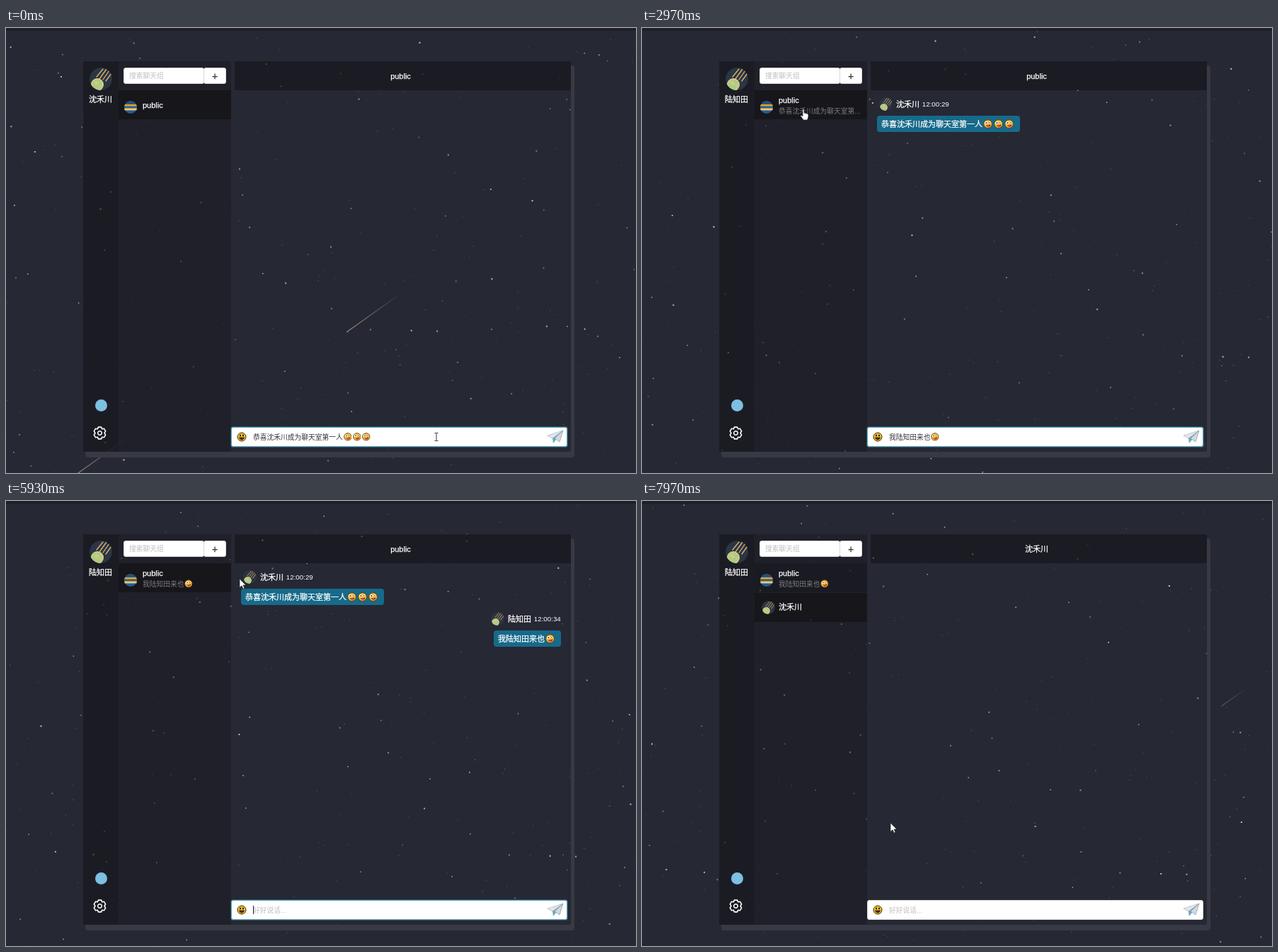
An HTML page with a canvas that plays this animation: 890x629 px, repeating every 8 s.

```html
<!DOCTYPE html>
<html lang="zh">
<head>
<meta charset="utf-8">
<title>Chat room</title>
<style>
html, body { margin: 0; width: 100%; height: 100%; overflow: hidden; background: #262834; }
#stage { position: absolute; left: 0; top: 0; width: 890px; height: 629px; overflow: hidden;
  font: 500 11px/20px "Liberation Sans", "Noto Sans CJK SC", "Noto Sans CJK", sans-serif; color: #fff; }
#stage div, #stage canvas { position: absolute; white-space: nowrap; box-sizing: border-box; }
.strong { -webkit-text-stroke: .25px; }
.small { font-size: 9.75px; font-weight: 400; }
.grey { color: #7b7c80; }
.hint { color: #bfbfbf; }
.ink { color: #333; }
.card { background: #fff; border-radius: 3px; }
.field { background: #fff; border: 1px solid #d9d9d9; border-radius: 3px; }
.focus { border: 1px solid #5aa9c4; border-radius: 3px; box-shadow: 0 0 0 1px rgba(87, 170, 200, .3); }
.panel { background: rgba(20, 19, 23, .58); }
.row { background: rgba(17, 17, 20, .65); }
.bubble { background: #176a8a; border-radius: 4px; }
.dot { background: #7cc0e3; border-radius: 50%; }
.mid { text-align: center; }
.emoji { width: 1.2em; height: 1.2em; margin: 0 .08em; vertical-align: -.27em; }
svg { display: block; }
.emoji { display: inline; }
#shadow { left: 109px; top: 47px; width: 689px; height: 552px; border-radius: 3px; box-shadow: 4px 7px 0 1px #373944; }
</style>
</head>
<body>
<svg width="0" height="0" style="position:absolute">
  <clipPath id="disc"><circle r="16"/></clipPath>
  <symbol id="comet" viewBox="-16 -16 32 32">
    <g clip-path="url(#disc)">
      <circle r="16" fill="#2b3544"/>
      <circle cx="-5" cy="8" r="9" fill="#e0cf8a"/>
      <circle cx="-5" cy="8" r="7.5" fill="#a9cc86"/>
      <path d="M-10 4l5-1 3 4-5 2zM-2 9l4-1-2 5z" fill="#d8c877"/>
      <path d="M3-14L-6-3M8-14L-2 0M12-12L3 1M15-8L7 3" stroke="#dfb56a" stroke-width="1.3" stroke-linecap="round"/>
    </g>
  </symbol>
  <symbol id="planet" viewBox="-10 -10 20 20">
    <circle r="9" fill="#1f5f96"/>
    <path d="M-8-4H8L8.800-1.500H-8.800zM-8.900 1H8.900L8.200 4H-8.200z" fill="#e8a02f"/>
    <path d="M-8.500 3H8.500V4.200H-8.300z" fill="#f4e3b8"/>
    <path d="M-5-7.500H5L7-5.500H-7z" fill="#36465c"/>
  </symbol>
  <symbol id="zany" viewBox="0 0 12 12">
    <circle cx="6" cy="6" r="5.4" fill="#f6b62c" stroke="#5b3b12" stroke-width=".8"/>
    <circle cx="3.8" cy="4.6" r="1.9" fill="#fff"/><circle cx="8" cy="4.2" r="1.4" fill="#fff"/>
    <circle cx="4" cy="4.7" r=".8"/><circle cx="8" cy="4.3" r=".6"/>
    <path d="M3 7.4Q6.5 8.6 9.4 6.5Q9.2 10 6 10Z" fill="#6b2d17"/>
    <path d="M5.4 8.4h2.6v1.6q-1.3 1.4-2.6 0z" fill="#e5566b"/>
  </symbol>
  <symbol id="smile" viewBox="0 0 14 14">
    <circle cx="7" cy="7" r="6" fill="#f7c331" stroke="#3a2c10"/>
    <ellipse cx="5" cy="5" rx=".9" ry="1.4"/><ellipse cx="9" cy="5" rx=".9" ry="1.4"/>
    <path d="M3 7.6H11Q10.4 11.4 7 11.4T3 7.6Z" fill="#4a2b12"/>
  </symbol>
  <symbol id="gear" viewBox="-10 -10 20 20">
    <path d="M-2-8H2L3-5.5 5.6-6 7.8-2.5 6.2 0 7.8 2.5 5.6 6 3 5.5 2 8H-2L-3 5.5-5.6 6-7.8 2.5-6.2 0-7.8-2.5-5.6-6-3-5.5Z"
      fill="none" stroke="#fff" stroke-width="1.5" stroke-linejoin="round"/>
    <circle r="2.7" fill="none" stroke="#fff" stroke-width="1.4"/>
  </symbol>
  <symbol id="plane" viewBox="0 0 24 22">
    <path d="M1 9L23 2 8 13Z" fill="#e4e7ea" stroke="#a9b0b6" stroke-width=".7"/>
    <path d="M23 2L8 13 9 20Z" fill="#69a9c6"/>
    <path d="M23 2L11 13 18 18Z" fill="#d3d9de" stroke="#8d979f" stroke-width=".7"/>
  </symbol>
  <symbol id="arrow" viewBox="0 0 14 20">
    <path d="M1 1V13.5L4 10.8 6 15.2 8 14.3 6 10H10Z" fill="#fff" stroke="#222" stroke-width=".7"/>
  </symbol>
  <symbol id="hand" viewBox="0 0 14 20">
    <path d="M4 2.2Q5 .5 6 2.2V7L11 8.2Q12 8.5 12 10V13L10.5 17H5L1 11.5Q1 9.5 4 11.5Z" fill="#fff" stroke="#222" stroke-width=".7"/>
  </symbol>
  <symbol id="beam" viewBox="0 0 14 20">
    <path d="M4.5 4.5H6.5L7 5 7.5 4.5H9.5M7 5V15M4.5 15.5H6.5L7 15 7.5 15.5H9.5" fill="none" stroke="#333"/>
  </symbol>
</svg>
<div id="stage"><canvas id="sky" width="890" height="629"></canvas><div id="shadow"></div></div>
<script>
const W = 890, H = 629, LOOP = 8000, STEP = 135;
const SENT = 540, SWITCH = 1620, FOCUS = 3900, REPLY = 5200, POPUP = 6300, FRIEND = 7540;
const ANNA = '沈禾川', BEN = '陆知田';
const HELLO = `恭喜${ANNA}成为聊天室第一人***`, ANSWER = `我${BEN}来也*`, PROMPT = '好好说话...';
const stage = document.getElementById('stage');
const parts = [];

// every part is visible from one time until another; * stands for the emoji
function add(css, html, cls, from = 0, to = LOOP) {
  const node = document.createElement('div');
  node.className = cls;
  node.style.cssText = css;
  node.innerHTML = html.replace(/\*/g, '<svg class="emoji"><use href="#zany"/></svg>');
  stage.append(node);
  parts.push({ node, from, to });
  return node;
}
const box = (x, y, w, h, cls, from, to) =>
  add(`left:${x}px;top:${y}px;width:${w}px;height:${h}px`, '', cls, from, to);
const text = (x, y, str, cls, from, to) => add(`left:${x}px;top:${y - 10}px`, str, cls, from, to);
const centred = (x, y, str, cls, from, to) =>
  add(`left:${x - 60}px;top:${y - 10}px;width:120px`, str, 'mid ' + cls, from, to);
const icon = (id, cx, cy, size, from, to) =>
  add(`left:${cx - size / 2}px;top:${cy - size / 2}px`,
    `<svg width="${size}" height="${size}"><use href="#${id}"/></svg>`, '', from, to);

function message(x, y, name, time, str, left, width, from, to) {
  icon('comet', x, y, 19, from, to);
  text(x + 15, y, name, 'strong', from, to);
  text(x + 51.8, y, time, 'small', from, to);
  box(left, y + 16, width, 23.5, 'bubble', from, to);
  text(left + 6.5, y + 28, str, 'strong', from, to);
}

// window frame
box(0, 0, W, 4, '').style.background = '#1e1f27';
box(109, 47, 50, 552, 'panel');
box(159, 47, 159, 552, '').style.background = 'rgba(24,23,27,.45)';
box(323, 47, 475, 41, 'panel');
box(159, 88, 159, 41, 'row', 0, FRIEND);
box(159, 88, 159, 41, 'row', FRIEND).style.opacity = .5;
box(159, 130, 159, 41, 'row', FRIEND);

// sidebar
icon('comet', 134, 72, 32);
centred(133.5, 101, ANNA, 'strong', 0, SWITCH);
centred(133.5, 101, BEN, 'strong', SWITCH);
box(125.5, 524.5, 17, 17, 'dot');
icon('gear', 132.5, 572, 21);

// group list
box(166, 56, 114, 23, 'field');
box(279, 56, 32, 23, 'field');
text(174, 68, '搜索聊天组', 'small hint');
centred(295, 67.5, '+', 'ink strong').style.fontSize = '14px';
icon('planet', 176, 112, 20);
text(193, 109, 'public', 'strong', 0, SENT);
text(193, 102, 'public', 'strong', SENT);
text(193, 117.5, HELLO.slice(0, 11) + '...', 'small grey', SENT, REPLY);
text(193, 117.5, ANSWER, 'small grey', REPLY);
icon('comet', 178, 150, 19, FRIEND);
text(193, 150, ANNA, 'strong', FRIEND);

// conversation
centred(557.5, 67.5, 'public', 'strong', 0, FRIEND);
centred(557.5, 67.5, ANNA, 'strong', FRIEND);
message(694, 107.5, ANNA, '12:00:29', HELLO, 581, 203, SENT, SWITCH);
message(344, 107.5, ANNA, '12:00:29', HELLO, 331.5, 202.5, SWITCH, FRIEND);
message(694, 166.5, BEN, '12:00:34', ANSWER, 688.5, 95.5, REPLY, FRIEND);

// input line
box(318, 564, 475, 28, 'field');
box(318, 564, 475, 28, 'focus', 0, POPUP);
icon('smile', 333, 577.5, 14);
icon('plane', 776, 577.5, 24);
text(349, 578.5, HELLO, 'small ink', 0, SENT);
text(349, 578.5, PROMPT, 'small hint', SENT, SWITCH);
text(349, 578.5, ANSWER, 'small ink', SWITCH, REPLY);
text(349, 578.5, PROMPT, 'small hint', REPLY);
const caret = box(349, 572, 1, 12, '');
caret.style.background = '#222';

// profile card
box(339, 126, 9, 9, 'card', POPUP, FRIEND).style.transform = 'rotate(45deg)';
box(302, 129, 83, 104, 'card', POPUP, FRIEND);
icon('comet', 343.5, 157, 34, POPUP, FRIEND);
centred(343.5, 191, ANNA, 'small', POPUP, FRIEND).style.cssText += 'font-size:12.6px;color:#555';
box(313, 203, 61, 22, 'card', POPUP, FRIEND).style.background = '#ade0f2';
centred(343.5, 214.5, '添加好友', 'small', POPUP, FRIEND);

// pointer stops: arrival time, x, y
const stops = [[600, 608, 578], [1215, 150, 17], [1485, 140, -22], [2700, 228, 113], [3240, 228, 113],
  [FOCUS, 447, 582], [4860, 447, 582], [5940, 329, 109], [7290, 345, 207], [7965, 350, 454]];
const pointer = add('left:0;top:0', '<svg width="14" height="20"><use/></svg>', '');
const pointerUse = pointer.querySelector('use');

function movePointer(t) {
  const next = stops.findIndex(s => s[0] >= t);
  const [t1, x1, y1] = stops[next], [t0, x0, y0] = stops[Math.max(0, next - 1)];
  const k = t1 > t0 ? (t - t0) / (t1 - t0) : 1, ease = k * k * (3 - 2 * k);
  const x = x0 + (x1 - x0) * ease, y = y0 + (y1 - y0) * ease;
  const beam = x > 345 && x < 760 && y > 564 && y < 592;
  const hand = x > 159 && x < 318 && y > 88 && y < 129;
  pointerUse.setAttribute('href', beam ? '#beam' : hand ? '#hand' : '#arrow');
  pointer.style.transform = `translate(${x - (beam ? 7 : hand ? 5 : 0)}px,${y - (beam ? 10 : 0)}px)`;
}

// night sky: three layers of stars, the nearer the faster
let seed = 7;
const rnd = () => (seed = seed * 16807 % 2147483647) / 2147483647;
const layer = (count, speed, size, colour, alpha) => ({
  speed, size, colour,
  stars: Array.from({ length: count }, () => [rnd() * W, rnd() * H, alpha * (.4 + .6 * rnd())])
});
const layers = [
  layer(210, 8, 1, '#d2d0b9', .45),
  layer(45, 13.2, 1.5, '#c5c1a6', 1),
  layer(40, 21.5, 2, '#dccf98', 1)
];
const DX = -.815, DY = .58;
const g = document.getElementById('sky').getContext('2d');
const wrap = (v, n) => ((v % n) + n) % n;

// a meteor fades in and out around its peak, when its head is at x, y
const meteors = [
  { peak: 0, x: 481, y: 430 }, { peak: 0, x: 95, y: 634 },
  { peak: 4500, x: 168, y: 426 }, { peak: 8280, x: 754, y: 336 }
];
function drawMeteor({ peak, x, y }, t) {
  const glow = Math.cos((t - peak) / 900 * Math.PI);
  if (Math.abs(t - peak) > 450) return;
  const d = (t - peak) * .25, len = 90 * glow;
  const hx = x + d * DX, hy = y + d * DY, tx = hx - len * DX, ty = hy - len * DY;
  const fade = g.createLinearGradient(hx, hy, tx, ty);
  fade.addColorStop(0, `rgba(190,176,140,${glow * .75})`);
  fade.addColorStop(1, 'rgba(190,176,140,.05)');
  g.strokeStyle = fade;
  g.lineWidth = 1.3;
  g.beginPath();
  g.moveTo(hx, hy);
  g.lineTo(tx, ty);
  g.stroke();
}
function drawSky(t) {
  g.clearRect(0, 0, W, H);
  const jump = t < SWITCH ? 0 : 300;
  for (const { speed, size, colour, stars } of layers) {
    const d = speed * t / 1000;
    g.fillStyle = colour;
    for (const [x, y, alpha] of stars) {
      g.globalAlpha = alpha;
      g.fillRect(wrap(x + jump + d * DX, W), wrap(y + d * DY, H), size, size);
    }
  }
  g.globalAlpha = 1;
  meteors.forEach(m => drawMeteor(m, t));
}

function render(now) {
  const t = Math.floor((now % LOOP + 30) / STEP) * STEP;
  drawSky(t);
  for (const { node, from, to } of parts)
    node.style.visibility = t >= from && t < to ? 'visible' : 'hidden';
  const blink = t >= FOCUS && t < POPUP && (t - 600) % 1060 < 530;
  caret.style.visibility = blink ? 'visible' : 'hidden';
  caret.style.left = (t < REPLY ? 421 : 349) + 'px';
  movePointer(t);
}
const start = performance.now();
(function tick() {
  render(performance.now() - start);
  requestAnimationFrame(tick);
})();
</script>
</body>
</html>
```
